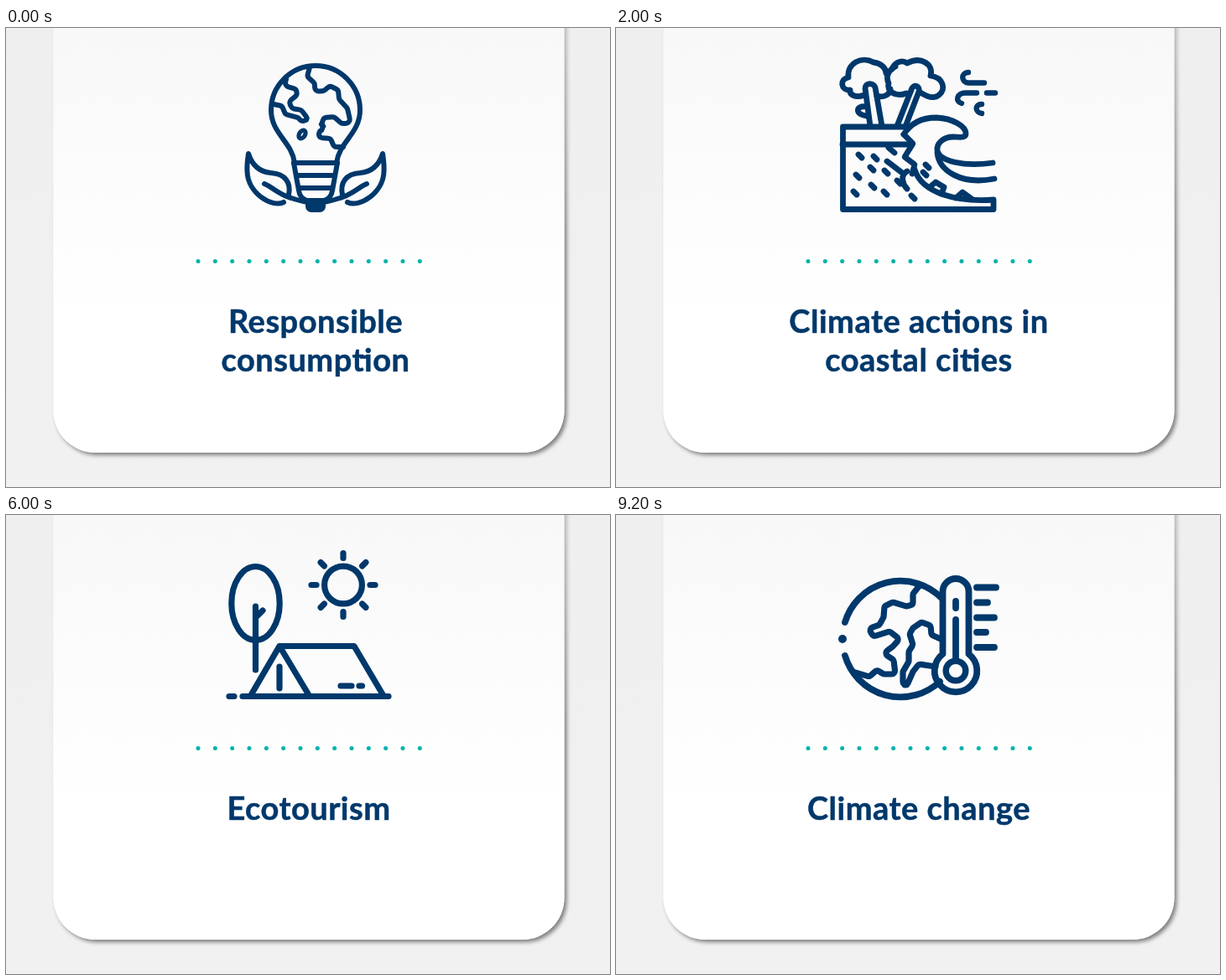
Write an HTML page with a canvas that moves like this. It is 720 px wide and 548 px high and loops after 10000 ms.

```html
<!DOCTYPE html>
<html lang="en">
<head>
<meta charset="utf-8">
<title>Sustainability topics</title>
<style>
html, body { margin: 0; width: 100%; height: 100%; overflow: hidden; background: #f0f0f0; }
canvas { display: block; width: 720px; height: 548px; }
</style>
</head>
<body>
<canvas id="stage" width="720" height="548"></canvas>
<script>
const ctx = document.getElementById('stage').getContext('2d');
const NAVY = '#00386b', TEAL = '#00b2ac';
const HOLD = 2000;

function stroke(d, width) {
  ctx.lineWidth = width;
  ctx.stroke(new Path2D(d));
}

// Polyline with rounded corners, points as "x,y x,y ..."
function coast(points, width, r = 4) {
  const p = points.split(' ').map(s => s.split(',').map(Number));
  const last = p[p.length - 1];
  ctx.lineWidth = width;
  ctx.beginPath();
  ctx.moveTo(...p[0]);
  for (let i = 1; i < p.length - 1; i++) ctx.arcTo(...p[i], ...p[i + 1], r);
  ctx.lineTo(...last);
  ctx.stroke();
}

function ring(x, y, rx, ry, width, turn = 0) {
  ctx.lineWidth = width;
  ctx.beginPath();
  ctx.ellipse(x, y, rx, ry, turn, 0, Math.PI * 2);
  ctx.stroke();
}

function disc(x, y, r) {
  ctx.beginPath();
  ctx.arc(x, y, r, 0, Math.PI * 2);
  ctx.fill();
}

function mirrored(axis, draw) {
  draw();
  ctx.save();
  ctx.translate(axis * 2, 0);
  ctx.scale(-1, 1);
  draw();
  ctx.restore();
}

function drawEarthBulb() {
  const w = 6;
  stroke('M344 161C341 136 316 126 316 98A53 53 0 0 1 422 98C422 126 397 136 394 161', w);
  stroke('M343 161H395M346 176H392M349 191H389', w);
  stroke('M343 161L349 194Q350 203 359 206H379Q388 203 389 194L395 161', w);
  ctx.beginPath();
  ctx.roundRect(357, 203, 24, 17, [3, 3, 7, 7]);
  ctx.fill();
  mirrored(369, () => {
    stroke('M331 208C317 215 288 197 287.5 171C287 163 288 157 289 150C294 166 304 172 316 173C333 174 340 185 337 199', w);
    stroke('M308 186C319 191 326 199 340 203C346 205 352 207 360 208', w);
  });
  coast('334,61 332,69 346,73 347,80 337,88 341,96 352,98 359,107 356,115 348,107 333,103 329,93 319,91', w, 5);
  coast('362,47 359,58 368,66 368,76 379,75 386,69 396,74 397,85 407,96 411,114 400,114 391,106 379,107 376,115 381,120 370,125 375,131 387,132 391,142 402,142', w, 5);
  ring(353, 127, 3.4, 5.4, 5.2, 0.55);
}

function drawCoast() {
  const w = 6.8;
  // box and wave
  stroke('M346 118H270.5V216.5H450V205C408 208 365 198 356 169', w);
  stroke('M270 139H347', w);
  stroke('M343 127C353 111 369 107 382 107C401 108 417 117 417 126C417 132 409 130 402 130C390 130 382 138 383 146C385 159 415 166 449 161', w);
  stroke('M383 149C385 170 411 188 451 180', w);
  coast('343,127 354,138 344,154 356,163 353,174', w, 1);
  stroke('M347 171C338 176 342 187 347 192M323 159L340 172M325 143L332 149', w);
  stroke('M374 190L381 184L391 190L388 198M405 203L413 196L424 204', w);
  const specks = ['291,153', '309,155', '288,177', '305,168', '322,172', '285,197',
    '306,189', '321,197', '337,184', '354,202', '371,165', '368,174'];
  for (const s of specks) {
    const [x, y] = s.split(',').map(Number);
    stroke(`M${x - 2} ${y - 2}l4 4`, 6.8);
  }
  // trees
  stroke('M296 80C286 84 278 80 279 74C268 75 266 61 277 59C275 42 293 33 307 41C317 42 322 49 322 54', w);
  stroke('M329 49C334 38 343 39 347 42C364 33 379 44 375 57C390 59 394 73 385 80C378 86 369 81 363 77', w);
  stroke('M333 46C325 50 321 58 325 66C322 75 333 83 346 78', w);
  stroke('M311 81C321 84 327 78 327 73', w);
  stroke('M303 117L297 72C297 65 307 65 309 71L317 117', w);
  stroke('M335 117L352 74C354 66 363 69 361 76L346 115', w);
  stroke('M298 94C285 92 285 104 299 105', w);
  // wind
  stroke('M420 53C411 53 411 65 420 65.5H439M430 77.5H417C406 77 404 88 412 90M442 77.5H452M436 91C427 91 428 101 436 102', 6.4);
}

function drawPlantBulb() {
  const w = 8.8;
  stroke('M342 165V158C342 148 333 147 325 141A60 60 0 1 1 397 141C389 147 380 148 380 158V165', w);
  ctx.lineWidth = w;
  ctx.beginPath();
  ctx.roundRect(331.5, 171, 59, 17.5, 8.7);
  ctx.stroke();
  stroke('M344 191L347 205Q349 215.5 361 215.5Q373 215.5 375 205L378 191', w);
  stroke('M361 87V167', w);
  stroke('M362 109C360 93 374 86 391 94C391 105 378 114 362 109Z', 8);
  stroke('M360 120C361 104 346 98 330 106C332 118 346 126 360 120Z', 8);
  mirrored(361, () => stroke('M282 47.5L294 54M270 93H283M282 138L294 132', w));
}

function drawCamp() {
  const w = 7.2;
  ring(297.5, 105.5, 28.7, 44, w);
  stroke('M297.5 109V185M299 121L306 114', w);
  ring(402, 83.5, 22.4, 22.4, w);
  for (let i = 0; i < 8; i++) {
    const c = Math.cos(i * Math.PI / 4), s = Math.sin(i * Math.PI / 4);
    stroke(`M${402 + 32 * c} ${83.5 + 32 * s}L${402 + 38 * c} ${83.5 + 38 * s}`, w);
  }
  stroke('M292 215L326 156.5H415L449.5 215M326 156.5L361 215', w);
  stroke('M266 216.5H272M282 216.5H456M326 181V207M399 204H412M421 204H424.5', w);
}

function drawWarming() {
  const w = 7.8;
  stroke('M273 128A69 69 0 0 1 388 99', w);
  stroke('M273 168A69 69 0 0 0 386 199', w);
  disc(270, 148, 5);
  coast('362,84 354,94 354,107 346,109 330,104 320,109 319,122 314,131 301,136 307,145 326,139 338,148 330,157 319,165 331,173 333,190 319,190 311,185 302,193 285,188', 7.2);
  coast('387,148 376,143 375,132 364,128 354,135 350,142 354,155 349,163 349,175 342,187 342,203 347,203 354,187 361,178 381,181', 7.2);
  stroke('M389.5 166V91.5A15.5 15.5 0 0 1 420.5 91.5V166A25.3 25.3 0 1 1 389.5 166Z', w);
  ring(405, 186, 11.8, 11.8, 7.4);
  stroke('M405 125V173M405 103V111', w);
  stroke('M430 86.5H453M430 104.5H443M430 122.5H451M430 140H441M430 158H451', w);
}

const scenes = [
  { draw: drawEarthBulb, x: 369, lines: ['Responsible', 'consumption'] },
  { draw: drawCoast, x: 361, lines: ['Climate actions in', 'coastal cities'] },
  { draw: drawPlantBulb, x: 361, lines: ['Among others'] },
  { draw: drawCamp, x: 361, lines: ['Ecotourism'] },
  { draw: drawWarming, x: 361, lines: ['Climate change'] }
];

function vertical(stops) {
  const g = ctx.createLinearGradient(0, 0, 0, 548);
  for (const [y, color] of stops) g.addColorStop(y / 548, color);
  return g;
}

function drawCard() {
  ctx.fillStyle = vertical([[0, '#efefef'], [548, '#f1f1f1']]);
  ctx.fillRect(0, 0, 720, 548);
  const card = new Path2D();
  card.roundRect(56.5, -80, 609, 587, 50);
  // the shadow grows stronger down the card
  ctx.save();
  ctx.shadowColor = 'rgba(0,0,0,.48)';
  ctx.shadowBlur = 5;
  ctx.shadowOffsetX = ctx.shadowOffsetY = 3;
  ctx.fillStyle = vertical([[0, 'rgba(255,255,255,.5)'], [250, '#fff'], [548, '#fff']]);
  ctx.fill(card);
  ctx.restore();
  ctx.fillStyle = vertical([[0, '#f8f8f8'], [240, '#fdfdfd'], [340, '#fff'], [548, '#fff']]);
  ctx.fill(card);
  ctx.fillStyle = TEAL;
  for (let i = 0; i < 14; i++) disc(229 + i * 20.33, 278.5, 2.5);
}

function drawLine(text, x, y) {
  const left = x - ctx.measureText(text).width / 2;
  ctx.lineWidth = 0.5;
  ctx.fillText(text, left, y);
  ctx.strokeText(text, left, y);
  // joined crossbar of the "ti" pair
  const at = text.indexOf('ti');
  if (at >= 0) {
    const start = left + ctx.measureText(text.slice(0, at + 1)).width;
    ctx.fillRect(start - 5, y - 19.4, 8, 4.2);
  }
}

function render(now) {
  const scene = scenes[Math.floor(now / HOLD) % scenes.length];
  drawCard();
  ctx.fillStyle = ctx.strokeStyle = NAVY;
  ctx.lineCap = ctx.lineJoin = 'round';
  scene.draw();
  ctx.font = '700 38px Lato, Carlito, sans-serif';
  ctx.letterSpacing = '0.5px';
  scene.lines.forEach((text, i) => drawLine(text, scene.x, 363.5 + i * 46.5));
}

const begin = performance.now();
function tick() {
  render(performance.now() - begin);
  requestAnimationFrame(tick);
}
tick();
</script>
</body>
</html>
```
